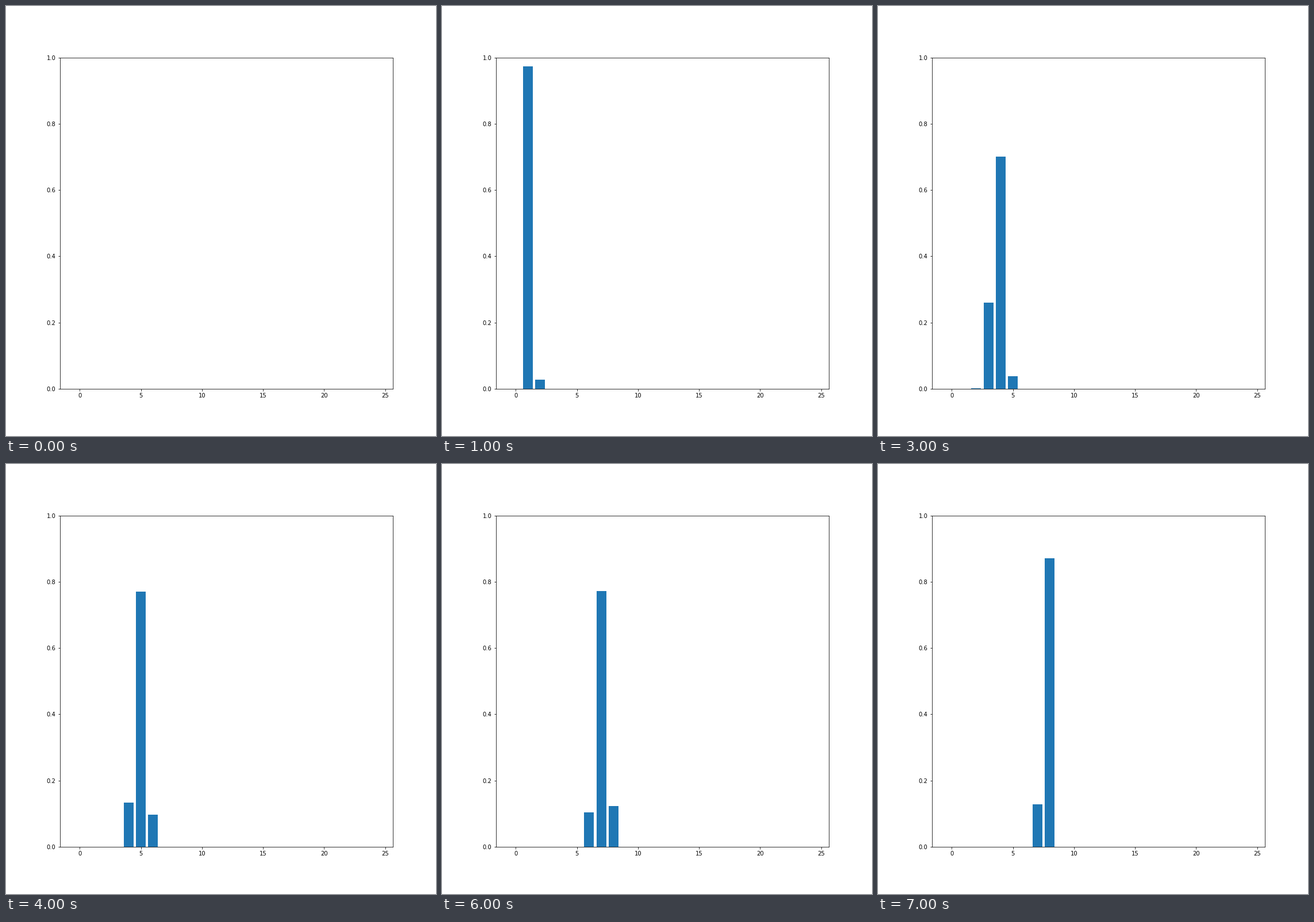
Animation of 748x748 px, one loop 8 s. Source, as a matplotlib script:

```python
import math

import matplotlib.pyplot as plt
import numpy as np
from matplotlib.animation import FuncAnimation

DPI = 72
CELLS = 25
STEPS = 8


def cdf(x, mean, spread):
    return 0.5 * (1 + math.erf((x - mean) / (spread * math.sqrt(2))))


def belief(step):
    """Normal position estimate, binned into unit cells."""
    # The estimate advances one cell per step, plus a drift.
    mean = step + np.interp(step, [1, 2, 3, 4, 6, 7],
                            [0.21, 0, 0.764, 0.96, 1.02, 0.67])
    spread = np.interp(step, [2, 3, 6, 7], [0.15, 0.414, 0.414, 0.15])
    edges = np.arange(CELLS + 1) - 0.5
    return np.diff([cdf(x, mean, spread) for x in edges])


fig, ax = plt.subplots(figsize=(748 / DPI, 748 / DPI), dpi=DPI)
bars = ax.bar(range(CELLS), [0] * CELLS, width=0.8, color="tab:blue")
ax.set_xlim(-1.64, 25.64)
ax.set_ylim(0, 1)


def update(step):
    # The chart starts empty.
    heights = belief(step) if step else np.zeros(CELLS)
    for bar, height in zip(bars, heights):
        bar.set_height(height)
    return bars.patches


anim = FuncAnimation(fig, update, frames=STEPS, interval=1000,
                     repeat=True, repeat_delay=0)
plt.show()
```
